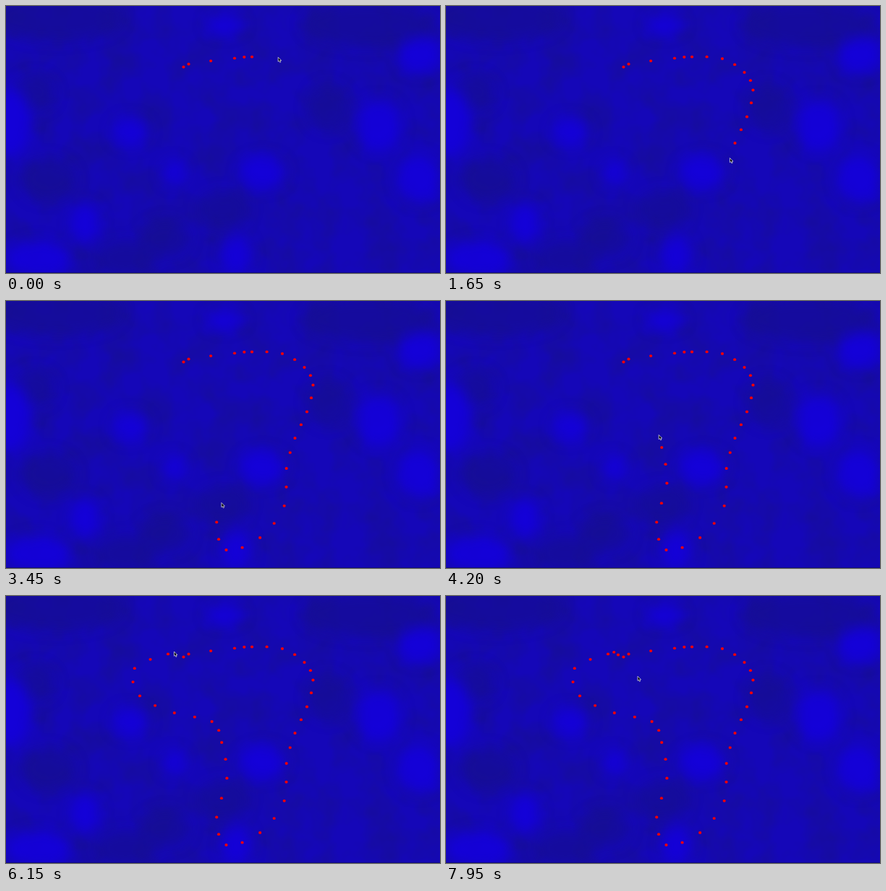
Recreate the animation shown at these times as an HTML page. Size 600x370 px, loop 8000 ms.

```html
<!DOCTYPE html>
<html lang="en">
<head>
<meta charset="utf-8">
<title>Dotted outline</title>
<style>
  html, body { margin: 0; width: 100%; height: 100%; overflow: hidden; background: #1507b6; }
  svg { display: block; width: 600px; height: 370px; }
</style>
</head>
<body>
<svg id="stage" viewBox="0 0 600 370">
  <defs>
    <filter id="soft" filterUnits="userSpaceOnUse" x="-80" y="-80" width="760" height="530" color-interpolation-filters="sRGB">
      <feGaussianBlur stdDeviation="9"/>
    </filter>
    <filter id="grain" filterUnits="userSpaceOnUse" x="0" y="0" width="600" height="370" color-interpolation-filters="sRGB">
      <feTurbulence type="fractalNoise" baseFrequency=".022" numOctaves="3" seed="4"/>
      <feColorMatrix values="0 0 0 0 .09  0 0 0 0 .06  0 0 0 0 .56  1.2 0 0 0 -.4"/>
    </filter>
  </defs>
  <rect width="600" height="370" fill="#1507b8"/>
  <rect width="600" height="370" filter="url(#grain)"/>
  <g filter="url(#soft)">
    <g id="dark" fill="#17108c" opacity=".6"></g>
    <g id="bright" fill="#1400de" opacity=".85"></g>
  </g>
  <rect y="369" width="600" height="1" fill="#100a80"/>
  <g id="dots" fill="#f80000"></g>
  <path id="cursor" d="M0 0V6.2L1.4 5L2.5 7.3L3.6 6.8L2.7 4.6H4.5Z" fill="#000" stroke="#d8d8e8" stroke-width=".8"/>
</svg>
<script>
const LOOP = 8000, STEP = 50, LAG = 0.9;

// centre x, centre y, radius x, radius y
const bright = [
  [172, 174, 25, 20], [355, 230, 32, 23], [515, 165, 32, 36], [110, 302, 20, 28],
  [302, 26, 26, 13], [319, 346, 21, 28], [45, 350, 45, 25], [572, 68, 28, 25],
  [6, 160, 28, 48], [232, 231, 16, 17], [570, 240, 30, 34]
];
const dark = [
  [70, 16, 90, 32], [300, 282, 36, 26], [220, 322, 34, 26], [58, 240, 38, 30],
  [40, 120, 28, 24], [165, 350, 40, 25], [500, 26, 90, 30], [445, 140, 28, 32]
];

// the drawn outline; the pointer leaves two dots per key point
const keys = [
  [246.4, 87.5], [252.5, 80.5], [316, 72.3], [340, 70.5], [382, 73], [412.5, 92],
  [424.5, 116.5], [416, 153.5], [399.5, 190], [387.7, 232], [384.7, 283.8], [351.2, 328],
  [304.5, 345], [291.2, 306.5], [305.4, 252.5], [298.2, 203], [284.6, 174], [232.8, 162],
  [185, 138.4], [177.8, 100.2], [224, 80.4], [238, 81.5], [265, 112]
];
const DOTS = 2 * keys.length - 4;

// time, position counted in dots
const pace = [[0, 6.7], [2650, 21.74], [4950, 33.98], [6150, 40.05], [6900, 43], [LOOP, 43]];

const $ = id => document.getElementById(id);

function ellipse(parent, cx, cy, rx, ry) {
  const el = document.createElementNS("http://www.w3.org/2000/svg", "ellipse");
  for (const [k, v] of Object.entries({ cx, cy, rx, ry })) el.setAttribute(k, v);
  return parent.appendChild(el);
}

function progress(t) {
  const i = pace.findIndex(p => p[0] > t);
  const [t0, u0] = pace[i - 1], [t1, u1] = pace[i];
  return u0 + (u1 - u0) * (t - t0) / (t1 - t0);
}

// smooth curve through the key points
function pointAt(u) {
  const last = keys.length - 1, s = (u + 1) / 2;
  const i = Math.min(Math.floor(s), last - 1), f = s - i;
  const [a, b, c, d] = [-1, 0, 1, 2].map(k => keys[Math.max(0, Math.min(last, i + k))]);
  return [0, 1].map(k => b[k] + f / 2 * (c[k] - a[k]
    + f * (2 * a[k] - 5 * b[k] + 4 * c[k] - d[k]
    + f * (3 * (b[k] - c[k]) + d[k] - a[k]))));
}

for (const spot of bright) ellipse($("bright"), ...spot);
for (const spot of dark) ellipse($("dark"), ...spot);
const dots = Array.from({ length: DOTS }, (_, i) => ellipse($("dots"), ...pointAt(i), 2.1, 1.9));

function draw(time) {
  const u = progress(Math.floor(time % LOOP / STEP) * STEP);
  const [x, y] = pointAt(u);
  $("cursor").setAttribute("transform", `translate(${x.toFixed(1)} ${(y - 0.8).toFixed(1)})`);
  dots.forEach((dot, i) => dot.setAttribute("visibility", u >= i + LAG ? "visible" : "hidden"));
}

const start = performance.now();
function tick() {
  draw(performance.now() - start);
  requestAnimationFrame(tick);
}
tick();
</script>
</body>
</html>
```
